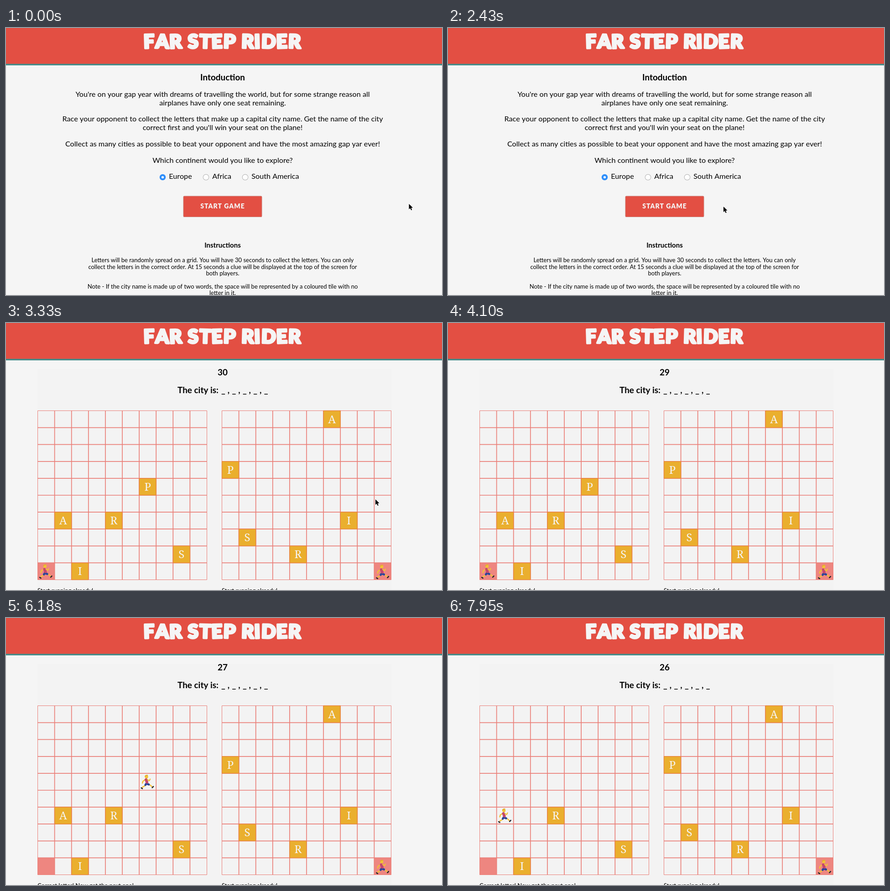
An HTML page with a canvas for the animation above (8000 ms loop, 956 px wide and 586 px high).

```html
<!DOCTYPE html>
<html lang="en">
<head>
<meta charset="utf-8">
<title>Far Step Rider</title>
<style>
  html, body { margin: 0; width: 100%; height: 100%; overflow: hidden; background: #f5f5f5; }
  canvas { display: block; }
</style>
</head>
<body>
<canvas id="stage" width="956" height="586"></canvas>
<script>
const ctx = document.getElementById('stage').getContext('2d');
const LOOP = 8000, BEAT = 147.7, FOCUS = 3180, GAME_START = 3330, RUN_START = 4550;
const MIDDLE = 475, CELL = 37.1, GRID_TOP = 192.5;
const RED = '#e34f43', PAPER = '#f5f5f5', PANEL = '#f3f3f3', LINE = '#ea7f78', PINK = '#ee8680', GOLD = '#eaaf2e';
const SANS = 'Lato, sans-serif';
const BODY = '16.2px ' + SANS, SMALL = '13px ' + SANS, HEADING = 'bold 18.9px ' + SANS;

const CITY = 'PARIS';
// Column and row of each letter of the city
const LEFT_CELLS = ['64', '16', '46', '29', '88'];
const RIGHT_CELLS = ['03', '60', '48', '76', '17'];

// One key press per beat; a dot is a beat of rest
const MOVES = 'UUURRRREUR..DDDLL.Q.LL..';
const STEP = { U: [0, -1], D: [0, 1], L: [-1, 0], R: [1, 0], E: [1, -1], Q: [-1, -1], '.': [0, 0] };

const INTRO = [
  ["You're on your gap year with dreams of travelling the world, but for some strange reason all",
   'airplanes have only one seat remaining.'],
  ['Race your opponent to collect the letters that make up a capital city name. Get the name of the city',
   "correct first and you'll win your seat on the plane!"],
  ['Collect as many cities as possible to beat your opponent and have the most amazing gap yar ever!'],
  ['Which continent would you like to explore?']
];
const INSTRUCTIONS = [
  ['Letters will be randomly spread on a grid. You will have 30 seconds to collect the letters. You can only',
   'collect the letters in the correct order. At 15 seconds a clue will be displayed at the top of the screen for',
   'both players.'],
  ['Note - If the city name is made up of two words, the space will be represented by a coloured tile with no',
   'letter in it.']
];

function rect(x, y, w, h, fill) {
  ctx.fillStyle = fill;
  ctx.fillRect(x, y, w, h);
}

function text(str, x, y, font, align = 'center', fill = '#000') {
  ctx.font = font;
  ctx.textAlign = align;
  ctx.fillStyle = fill;
  ctx.fillText(str, x, y);
}

function paragraphs(list, y, lineHeight, gap, font) {
  for (const lines of list) {
    for (const line of lines) {
      text(line, MIDDLE, Math.round(y), font);
      y += lineHeight;
    }
    y += gap;
  }
}

function stroke(color, width, path) {
  ctx.strokeStyle = color;
  ctx.lineWidth = width;
  ctx.stroke(new Path2D(path));
}

function disc(x, y, r, fill) {
  ctx.beginPath();
  ctx.arc(x, y, r, 0, 2 * Math.PI);
  ctx.fillStyle = fill;
  ctx.fill();
}

function roundRect(x, y, w, h, r, color, width) {
  ctx.beginPath();
  ctx.roundRect(x, y, w, h, r);
  ctx.strokeStyle = color;
  ctx.lineWidth = width;
  ctx.stroke();
}

function drawHeader() {
  rect(0, 0, 956, 78, RED);
  rect(0, 78, 956, 1, '#a8645c');
  rect(0, 79, 956, 3, '#438d8a');

  const title = [...'FAR STEP RIDER'], spacing = 1.5;
  ctx.font = '900 42px ' + SANS;
  ctx.textAlign = 'center';
  ctx.fillStyle = ctx.strokeStyle = PAPER;
  ctx.lineWidth = 4;
  const widths = title.map(c => ctx.measureText(c).width + spacing);
  let x = MIDDLE - 1 - widths.reduce((a, b) => a + b) / 2;
  title.forEach((letter, i) => {
    ctx.save();
    ctx.translate(x + widths[i] / 2, 44.5);
    ctx.rotate(i % 2 ? 0.03 : -0.03);
    ctx.fillText(letter, 0, 0);
    ctx.strokeText(letter, 0, 0);
    ctx.restore();
    x += widths[i];
  });
}

function drawRadio(label, x, selected) {
  disc(x, 327.5, 6.8, selected ? '#2f8ffb' : '#b0b0b0');
  disc(x, 327.5, selected ? 2.6 : 5.8, '#fff');
  text(label, x + 13.8, 331, BODY, 'left');
}

function drawIntro(t) {
  text('Intoduction', MIDDLE, 115, HEADING);
  paragraphs(INTRO, 151, 18.7, 17.1, BODY);
  drawRadio('Europe', 343.5, true);
  drawRadio('Africa', 438.5);
  drawRadio('South America', 524.5);

  rect(389, 369, 172, 45.5, RED);
  roundRect(389, 369, 172, 45.5, 2, '#c9837c', 1);
  if (t >= FOCUS) roundRect(387.3, 366.8, 175.4, 49.4, 3, '#78b4f6', 3);
  ctx.letterSpacing = '1px';
  text('START GAME', MIDDLE, 396, '900 14px ' + SANS, 'center', PAPER);
  ctx.letterSpacing = '0px';

  text('Instructions', MIDDLE, 482, 'bold 15px ' + SANS);
  paragraphs(INSTRUCTIONS, 514, 14.5, 14, SMALL);
}

function drawRunner(x, y) {
  const skin = '#f2c136', shoe = '#26262e', shorts = '#2c4699', shirt = '#c4476c';
  ctx.save();
  ctx.translate(x, y);
  ctx.lineCap = 'round';
  stroke(skin, 2.5, 'M9 12L5 15L4 19 M11 21L9 25L4 28 M18 22L22 24L25 27');
  stroke(shoe, 2.6, 'M1.5 29.5L4 31 M25.5 29L28 26.5');
  stroke(shorts, 4.5, 'M10.5 23L12.5 20L18 22');
  stroke(shirt, 6, 'M12 11.5L14 17');
  stroke(skin, 2.2, 'M15 11L19 14L21 10');
  disc(13, 5, 3.6, skin);
  stroke('#e3ae2c', 2, 'M10 4L11.5 2L15 1.5');
  ctx.restore();
}

function drawGrid(left, cells, found, startCol) {
  const size = 10 * CELL;
  rect(left + startCol * CELL, GRID_TOP + 9 * CELL, CELL, CELL, PINK);
  for (let i = 0; i <= 10; i++) {
    const x = left + i * CELL, y = GRID_TOP + i * CELL;
    stroke(LINE, i % 10 ? 1.7 : 1, `M${x} ${GRID_TOP}v${size} M${left} ${y}h${size}`);
  }
  cells.forEach(([col, row], i) => {
    if (i < found) return;
    const x = left + col * CELL, y = GRID_TOP + row * CELL;
    rect(x, y, CELL, CELL, GOLD);
    stroke('#e9853f', 1.5, `M${x} ${y}h${CELL}v${CELL}h${-CELL}z`);
    text(CITY[i], x + CELL / 2, y + 27, '24px "Noto Serif", serif', 'center', PAPER);
  });
}

// Replays the key presses; resting two beats on the next letter collects it.
function playUntil(t) {
  const beats = Math.max(0, Math.floor((t - RUN_START) / BEAT) + 1);
  let col = 0, row = 9, found = 0, rest = 0;
  for (const move of MOVES.slice(0, beats)) {
    col += STEP[move][0];
    row += STEP[move][1];
    rest = move === '.' ? rest + 1 : 0;
    if (rest === 2 && LEFT_CELLS[found] === `${col}${row}`) found++;
  }
  return { col, row, found };
}

function drawGame(t) {
  const { col, row, found } = playUntil(t);
  const elapsed = Math.max(0, Math.floor((t - 4100) / 1035) + 1);

  rect(69, 101, 776, 485, PANEL);
  text(30 - elapsed, MIDDLE, 115, HEADING);
  text('The city is:', 376, 154, HEADING, 'left');
  for (let i = 0; i < CITY.length; i++) {
    if (i) text(',', 464.6 + i * 23.4, 154, HEADING);
    text('_', 476.5 + i * 23.4, 154, HEADING);
  }

  drawGrid(69.5, LEFT_CELLS, found, 0);
  drawGrid(473.5, RIGHT_CELLS, 0, 9);

  // A letter in the same cell pushes the runner aside
  const push = LEFT_CELLS.indexOf(`${col}${row}`) >= found ? 8 : 0;
  drawRunner(72.5 + col * CELL + push, GRID_TOP + row * CELL + 2.5);
  drawRunner(477 + 9 * CELL, GRID_TOP + 9 * CELL + 3.5);

  const waiting = 'Start running already!';
  text(found ? 'Correct letter! Now get the next one!' : waiting, 69, 592, SMALL, 'left');
  text(waiting, 473, 592, SMALL, 'left');
}

function drawCursor(t) {
  const glides = [
    { start: 0, x: 883.5, y: 386, speed: 63 },
    { start: 2430, x: 604, y: 392, speed: -32.7 },
    { start: GAME_START, x: 810, y: 387, speed: 107 }
  ];
  const { start, x, y, speed } = glides.findLast(g => g.start <= t);
  const beats = Math.floor((t - start) / BEAT);
  ctx.save();
  ctx.translate(Math.max(506, x + speed * beats), y);
  const arrow = 'M0 0V12L2.8 9.6L4.8 14L6.8 13.2L4.9 8.8L8.6 8.6Z';
  stroke('#fff', 2, arrow);
  ctx.fillStyle = '#000';
  ctx.fill(new Path2D(arrow));
  ctx.restore();
}

function draw(now) {
  const t = now % LOOP;
  ctx.lineJoin = 'round';
  rect(0, 0, 956, 586, PAPER);
  drawHeader();
  (t < GAME_START ? drawIntro : drawGame)(t);
  drawCursor(t);
  requestAnimationFrame(draw);
}
requestAnimationFrame(draw);
</script>
</body>
</html>
```
